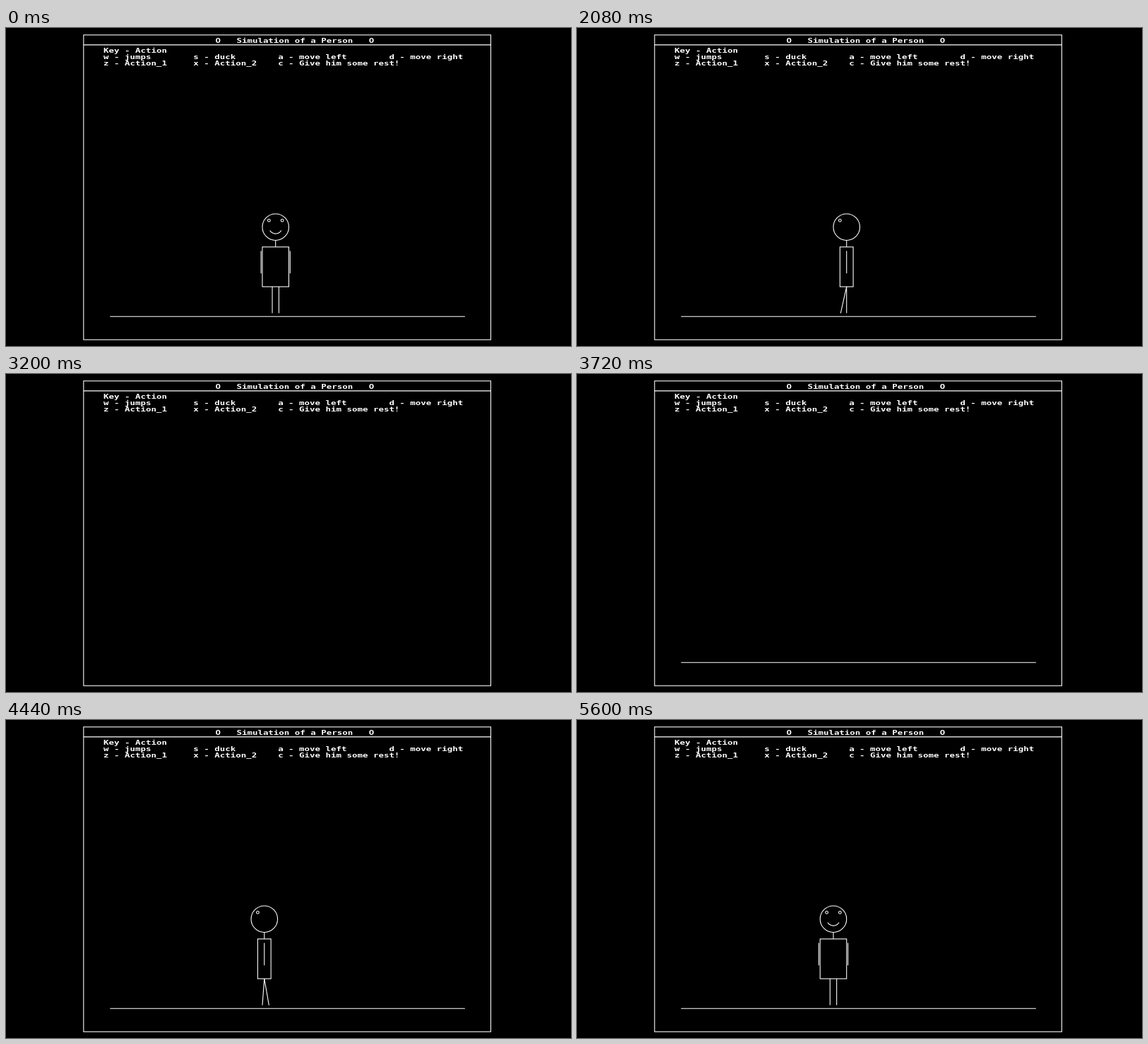
Recreate the animation shown at these times as an HTML page with a canvas. Size 800 by 450 pixels, loop 5640 ms.

```html
<!DOCTYPE html>
<html lang="en">
<head>
<meta charset="utf-8">
<title>Simulation of a Person</title>
<style>
  html, body { margin: 0; width: 100%; height: 100%; overflow: hidden; background: #000; }
  canvas { display: block; }
</style>
</head>
<body>
<canvas id="stage" width="800" height="450"></canvas>
<script>
const ctx = document.getElementById('stage').getContext('2d');
const LOOP = 5640, TICK = 40, WALK_START = 1480, WALK_END = 5360;
const SCALE = 0.9375;            // 640x480 screen shown 600x450
const CELL = 8, SQUASH = 0.72;   // square character cells

const ROWS = [
  [210, 15, 'O   Simulation of a Person   O'],
  [41, 30, 'Key - Action'],
  [41, 40, 'w - jumps        s - duck        a - move left        d - move right'],
  [41, 50, 'z - Action_1     x - Action_2    c - Give him some rest!']
];
const TITLE_LENGTH = ROWS[0][2].length;

// Time in ms against the count of small walking moves
const PACE = [[1480, 0.01], [2080, 9.5], [4080, 42.5], [4760, 51.5], [5360, 60]];
const MOVES = 30, STRIDE = 10;

// Redraw flicker: F complete, N figure unfinished, T text unfinished
const FLICKER = 'NTFNFTNF';

function line(x1, y1, x2, y2) {
  ctx.beginPath();
  ctx.moveTo(x1 + 0.5, y1 + 0.5);
  ctx.lineTo(x2 + 0.5, y2 + 0.5);
  ctx.stroke();
}

function box(x1, y1, x2, y2) {
  ctx.strokeRect(x1 + 0.5, y1 + 0.5, x2 - x1, y2 - y1);
}

function arc(x, y, r, from = 0, to = 2 * Math.PI) {
  ctx.beginPath();
  ctx.arc(x + 0.5, y + 0.5, r, from, to);
  ctx.stroke();
}

function drawText(count) {
  ctx.font = `bold ${CELL / 0.602}px "DejaVu Sans Mono", monospace`;
  for (const [x, y, text] of ROWS) {
    ctx.save();
    ctx.translate(x - 0.4, y + 7);
    ctx.scale(1, SQUASH);
    ctx.fillText(text.slice(0, Math.max(0, count)), 0, 0);
    ctx.restore();
    count -= text.length;
  }
}

function drawScreen(count) {
  box(10, 10, 625, 470);
  if (count >= TITLE_LENGTH) line(10, 25, 625, 25);
  drawText(count);
}

const ground = () => line(50, 435, 586, 435);

function head(x) {
  arc(x, 300, 20);
  arc(x - 10, 290, 2);
  line(x, 320, x, 330);
}

const arm = x => line(x, 336, x, 370);

function frontParts(x) {
  return [
    ground,
    () => {
      head(x);
      arc(x + 10, 290, 2);
      arc(x, 300, 10, Math.PI / 6, Math.PI * 5 / 6);
    },
    () => {
      box(x - 20, 330, x + 20, 390);
      arm(x - 22);
      arm(x + 22);
    },
    () => {
      for (const dx of [-5, 5]) line(x + dx, 390, x + dx, 430);
    }
  ];
}

function sideParts({ x, front, back }) {
  return [
    ground,
    () => head(x),
    () => {
      box(x - 10, 330, x + 10, 390);
      arm(x);
    },
    () => {
      line(x, 390, front, 430);
      line(x, 390, back, 430);
    }
  ];
}

function movesAt(t) {
  const k = Math.max(1, PACE.findIndex(p => t <= p[0]));
  const [t0, m0] = PACE[k - 1], [t1, m1] = PACE[k];
  return Math.floor(m0 + (m1 - m0) * (t - t0) / (t1 - t0));
}

// Reach with the front foot, shift the body, pull the back foot in
function pose(move) {
  const start = 300 - STRIDE * Math.floor(move / MOVES);
  const m = move % MOVES;
  const part = from => Math.min(STRIDE, Math.max(0, m - from));
  return {
    front: start - part(0),
    x: start - part(STRIDE),
    back: start - part(2 * STRIDE)
  };
}

function textCount(n) {
  const count = (n * 29 + 137) % 160;
  return n >= 30 && n <= 60 ? Math.max(42, count) : count;
}

function render(time) {
  const t = Math.floor(time / TICK) * TICK;
  const n = (t - WALK_START) / TICK;
  let parts, shown = 4, chars = Infinity;

  if (n < 0) {
    parts = frontParts(300);
  } else if (t >= WALK_END) {
    parts = frontParts(280);
  } else if (n < 2) {
    parts = [...frontParts(300), ...sideParts(pose(0)).slice(2)];
    shown = parts.length;
  } else {
    parts = sideParts(pose(movesAt(t)));
    const state = FLICKER[n % FLICKER.length];
    if (state === 'N') shown = (n + 1) % 4;
    if (state === 'T' && n < 91) chars = textCount(n);
  }

  ctx.setTransform(1, 0, 0, 1, 0, 0);
  ctx.fillStyle = '#000';
  ctx.fillRect(0, 0, 800, 450);
  ctx.setTransform(SCALE, 0, 0, SCALE, 100, 0);
  ctx.fillStyle = ctx.strokeStyle = '#fff';
  ctx.lineWidth = 1.15;
  drawScreen(chars);
  parts.slice(0, shown).forEach(draw => draw());
}

const begin = performance.now();
function loop() {
  render((performance.now() - begin) % LOOP);
  requestAnimationFrame(loop);
}
loop();
</script>
</body>
</html>
```
